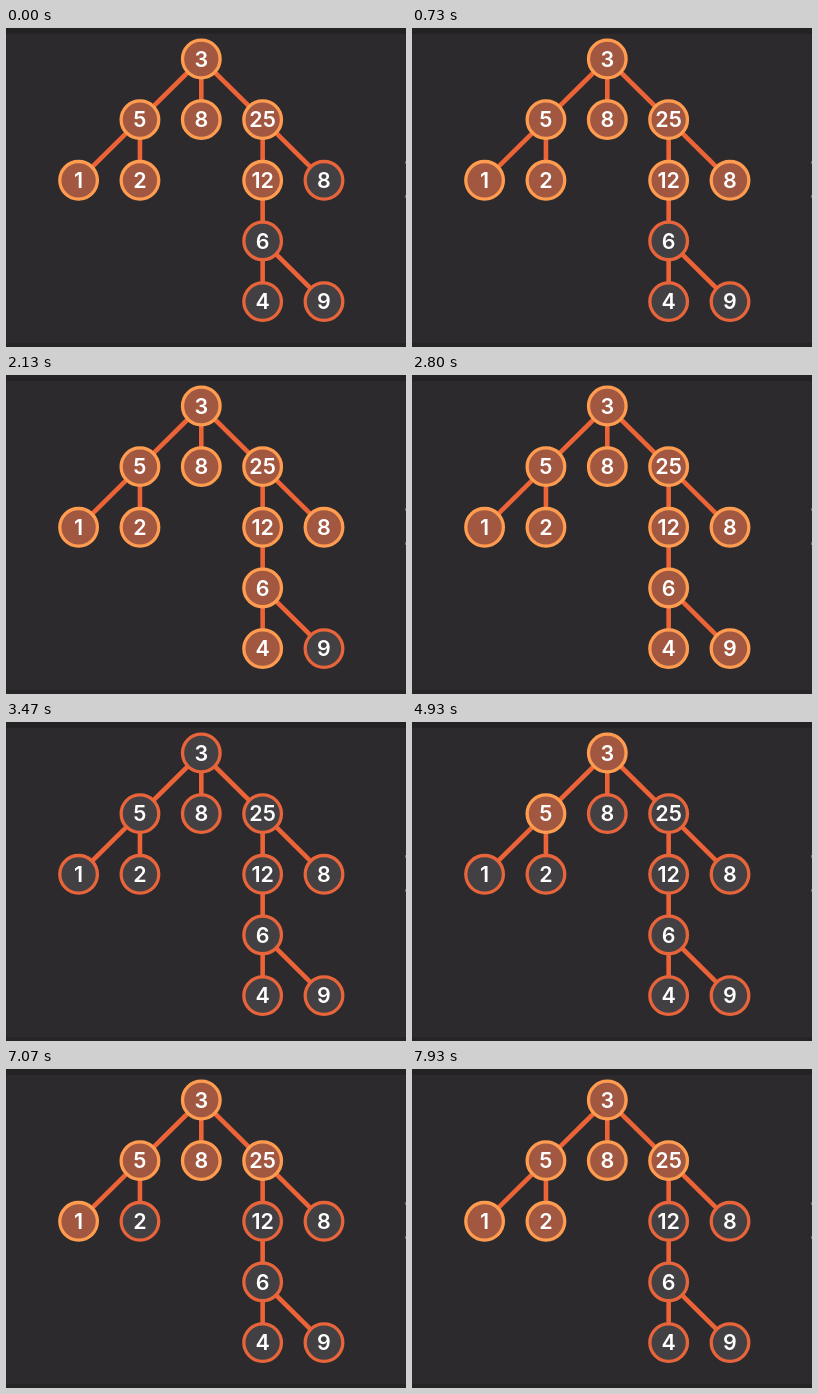
An HTML page that plays this animation: 400x319 px, repeating every 8000 ms.

```html
<!DOCTYPE html>
<html lang="en">
<head>
<meta charset="utf-8">
<title>Breadth-first traversal</title>
<style>
  html, body { margin: 0; width: 100%; height: 100%; overflow: hidden; background: #2c2a2c; }
  svg { display: block; width: 100vw; height: 100vh; }
  line { stroke: #ec6338; stroke-width: 4.6; }
  circle { fill: #424042; stroke: #e8643a; stroke-width: 3.3; }
  .visited circle { fill: #a25741; stroke: #ff9c50; }
  text { fill: #fff; font: 600 21.5px Inter, "Open Sans", sans-serif; text-anchor: middle; }
</style>
</head>
<body>
<svg viewBox="0 0 400 319">
  <rect width="400" height="319" fill="#2c2a2c"/>
  <rect width="400" height="6" fill="#242224"/>
  <rect y="315" width="400" height="4" fill="#262426"/>
  <path d="M399.5 133v3M399.5 167v3" stroke="#6a686a"/>
  <g id="edges"></g>
  <g id="nodes"></g>
</svg>
<script>
const LOOP = 8000;
const STEP = 700;
const FIRST_TICK = 65;
const RESET = 3465;
const RESTART = 4225;
const VISITED_AT_START = 7;

// Breadth-first order: label, column, row, parent index
const tree = [
  [3, 2, 0], [5, 1, 1, 0], [8, 2, 1, 0], [25, 3, 1, 0],
  [1, 0, 2, 1], [2, 1, 2, 1], [12, 3, 2, 3], [8, 4, 2, 3],
  [6, 3, 3, 6], [4, 3, 4, 8], [9, 4, 4, 8]
];
const xOf = col => 72.6 + col * 61.35;
const yOf = row => 31 + row * 60.65;

function add(parent, tag, attrs = {}) {
  const el = document.createElementNS("http://www.w3.org/2000/svg", tag);
  for (const key in attrs) el.setAttribute(key, attrs[key]);
  return parent.appendChild(el);
}

const edges = document.getElementById("edges");
const nodes = document.getElementById("nodes");
const groups = tree.map(([label, col, row, parent]) => {
  const x = xOf(col), y = yOf(row);
  if (parent !== undefined) {
    const [, pCol, pRow] = tree[parent];
    add(edges, "line", { x1: xOf(pCol), y1: yOf(pRow), x2: x, y2: y });
  }
  const group = add(nodes, "g");
  add(group, "circle", { cx: x, cy: y, r: 18.8 });
  add(group, "text", { x, y: y + 7.8 }).textContent = label;
  return group;
});

const ticksSince = (t, begin) => Math.max(0, Math.floor((t - begin) / STEP) + 1);

function visitedCount(t) {
  return t < RESET ? VISITED_AT_START + ticksSince(t, FIRST_TICK) : ticksSince(t, RESTART);
}

function draw(time) {
  const count = visitedCount(time % LOOP);
  groups.forEach((group, i) => group.classList.toggle("visited", i < count));
}

const start = performance.now();
function tick() {
  draw(performance.now() - start);
  requestAnimationFrame(tick);
}
tick();
</script>
</body>
</html>
```
